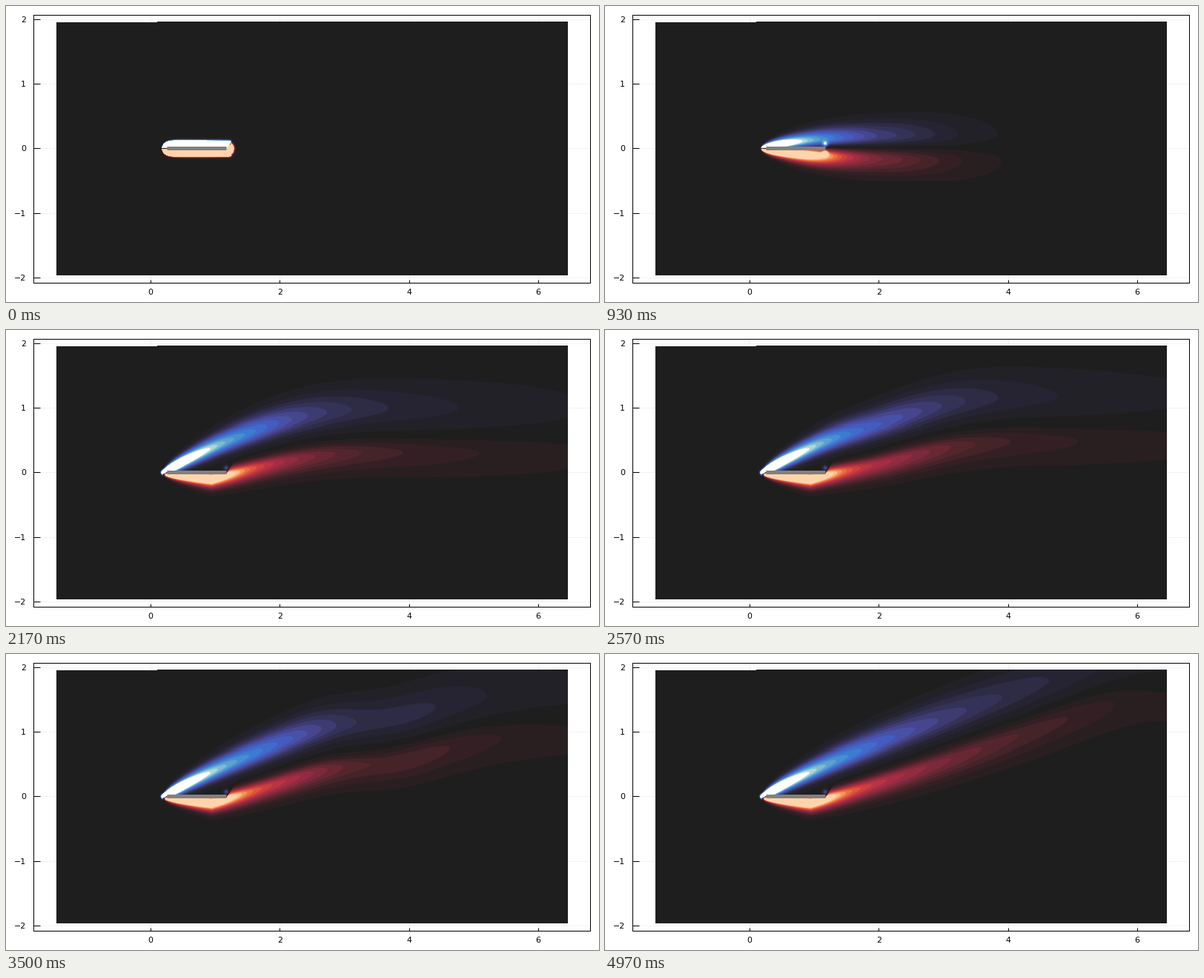
Write a matplotlib script that moves like this. It is 800 px wide and 400 px high and loops after 5010 ms.

```python
import numpy as np
import matplotlib.pyplot as plt
from matplotlib.animation import FuncAnimation
from matplotlib.colors import LinearSegmentedColormap

FRAMES, LOOP_MS = 150, 5010
W, H, DPI = 800, 400, 100
SCALE, CX, CY = 87.1, 195.2, 192.5
PT = 72 / DPI


def to_x(px):
    return (px - CX) / SCALE


def to_y(px):
    return (CY - px) / SCALE


# Pixel window that holds the moving vorticity
LEFT, RIGHT, TOP, BOTTOM = 204, 758, 22, 236
x = to_x(np.arange(LEFT, RIGHT) + 0.5)
y = to_y(np.arange(TOP, BOTTOM) + 0.5)[:, None]

LE, TE = 0.17, 1.17
d = np.maximum(x - LE, 1e-4)  # distance behind the leading edge
wake = np.maximum(x - 0.95, 0)
DRIFT = 0.068  # wake speed per frame
SLOPE = 0.355  # final slope of the tilted wake

COLD = ["#bde7db", "#69a9cd", "#3a82d3", "#4460c6", "#494895", "#37335b", "#272534"]
WARM = ["#352125", "#58262f", "#812a3d", "#ab2d44", "#d5433b", "#ee7c3f", "#ffd4ac"]
DARK = "#1f1e1e"
ICEFIRE = LinearSegmentedColormap.from_list("icefire", COLD + [DARK] + WARM, N=1024)
BANDS = ICEFIRE(np.linspace(-15, 15, 31) / 29 + 0.5)[:, :3]
BANDS[0] = 1  # below the range nothing is filled


def pitch(t):
    """Smooth rise of the inflow angle, 0 to 1."""
    u = np.clip((t - 21) / 44, 0, 1)
    return u * u * (3 - 2 * u)


def tilt(k):
    """Local wake tilt: the pitch history carried downstream, dented by the shed vortex."""
    t = k - wake / DRIFT
    dent = 1.4 * wake / (wake + 2) * np.exp(-((t - 70) / 10) ** 2)
    return pitch(t) - dent


def limit(a, b):
    """Smooth minimum of two widths."""
    return (a ** -4 + b ** -4) ** -0.25


def sheet(k, side):
    """Strength of the shear layer above (+1) or below (-1) the plate."""
    p, lean = pitch(k), tilt(k)
    upper = side > 0

    # Ridge line: symmetric spread, then lifted along the tilted wake
    spread = 0.21 * (1 - np.exp(-d / (1.0 if upper else 1.3)))
    start = 0.2 if upper else 0.95
    lift = np.cumsum(np.where(x > start, lean, 0)) * SLOPE / SCALE
    mid = side * spread * min(k / 28, 1) ** 0.5 + lift

    # Log strength: decay downstream, cut off at the advancing front
    log = 3.05 - (0.46 if upper else 0.43) * x
    log = log + np.exp(-d / 0.25) + 4.5 * np.exp(-k / 2.5)
    if not upper:
        log += 0.3 * np.exp(-((x - 1) / 0.5) ** 2)
    log -= 0.45 * (1 - lean) * np.clip(x / 2, 0, 1) ** 2
    ahead = np.maximum(x - 1.2 - 0.001 * k * k, 0)
    log -= 0.4 * (28 / (k + 0.3)) ** 1.5 * ahead ** 2

    # Widths grow by diffusion in time and along the stream
    age = np.sqrt(0.0018 + 0.003 * k)
    outer = limit((0.125 + (0.018 if upper else -0.01) * p) * d ** 0.5, age)
    inner = limit((0.075 + (0.045 if upper else 0) * p) * d ** 0.4, age)
    off = side * (y - mid)
    width = np.where(off > 0, outer, inner)

    gap = np.maximum(x - TE, 0) * 1.5
    gate = np.clip((side * y + gap) / 0.03, 0, 1) * (x > LE)
    return gate * np.exp(log - 0.5 * (off / width) ** 2)


def spot(sx, sy, r):
    return np.exp(-0.5 * ((y - sy) / r) ** 2) * np.exp(-0.5 * ((x - sx) / r) ** 2)


def vorticity(k):
    p, grown = pitch(k), min(k / 28, 1)
    f = sheet(k, -1) - sheet(k, 1)
    f -= 60 * p * spot(0.2, 0, 0.022)
    f -= (9 - 3 * p) * grown * spot(TE, 0.07, 0.03)
    f += 9 * (1 - p) * grown * spot(TE, -0.07, 0.03)
    return np.clip(f, -15, 14.99)


def paint(f):
    """Flat colour bands with softened edges."""
    gy, gx = np.gradient(f)
    low = np.floor(f)
    mix = np.clip((f - low - 0.5) / (np.hypot(gx, gy) + 1e-6) + 0.5, 0, 1)[..., None]
    n = low.astype(int) + 15
    return BANDS[n] * (1 - mix) + BANDS[n + 1] * mix


plt.rcParams["font.family"] = "DejaVu Sans"
fig = plt.figure(figsize=(W / DPI, H / DPI), dpi=DPI, facecolor="white")
x0, x1, y0, y1 = 37.1, 788, 373.9, 11.9
ax = fig.add_axes([x0 / W, 1 - y0 / H, (x1 - x0) / W, (y0 - y1) / H])

ax.add_patch(plt.Rectangle((to_x(68), to_y(363.5)), 690 / SCALE, 341.5 / SCALE,
                           fc=DARK, lw=0, zorder=1))
image = ax.imshow(paint(vorticity(0)), interpolation="nearest", aspect="auto", zorder=2,
                  extent=(to_x(LEFT), to_x(RIGHT), to_y(BOTTOM), to_y(TOP)))
ax.plot([to_x(217), to_x(297)], [0, 0], color="#808080", lw=5 * PT,
        solid_capstyle="butt", zorder=3)

ax.set_xlim(to_x(x0), to_x(x1))
ax.set_ylim(to_y(y0), to_y(y1))
ax.set_xticks(range(0, 7, 2))
ax.set_yticks(range(-2, 3))
ax.set_axisbelow(True)
ax.grid(color="black", alpha=0.1, lw=0.5 * PT)
ax.tick_params(direction="in", width=PT, labelsize=11 * PT)
ax.tick_params(axis="x", length=4.5 * PT, pad=8.3 * PT)
ax.tick_params(axis="y", length=9 * PT, pad=10 * PT)
for spine in ax.spines.values():
    spine.set_linewidth(PT)


def draw(k):
    image.set_data(paint(vorticity(k)))
    return [image]


anim = FuncAnimation(fig, draw, frames=FRAMES, interval=LOOP_MS / FRAMES,
                     repeat=True, repeat_delay=0, blit=False)
plt.show()
```
